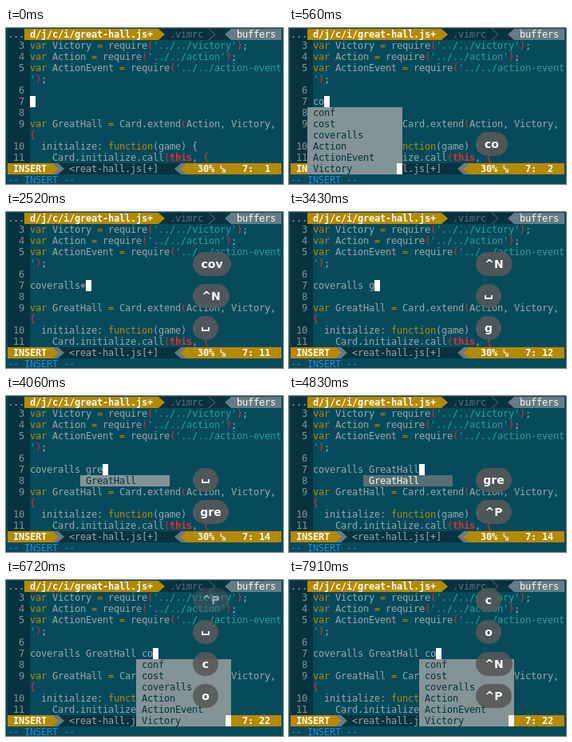
Animation of 347x195 px, one loop 8000 ms. Source, as an HTML page with a canvas:

```html
<!DOCTYPE html>
<html lang="en">
<head>
<meta charset="utf-8">
<title>Editor completion</title>
<style>
html, body { margin: 0; width: 100%; height: 100%; overflow: hidden; background: #064a5c; }
canvas { display: block; }
</style>
</head>
<body>
<canvas id="stage" width="347" height="195"></canvas>
<script>
const ctx = document.getElementById('stage').getContext('2d');
const LOOP = 8000, TICK = 70;
const CELL_W = 7, CELL_H = 14, LEFT = 2, TOP = 1, TEXT_COL = 4, INPUT_ROW = 6, STATUS_ROW = 12;
const MONO = '12px "DejaVu Sans Mono", monospace';
const color = {
  bg: '#064a5c', dark: '#07333f', text: '#9aa8a8', number: '#839496', dim: '#5b7178',
  yellow: '#b58900', red: '#dc322f', cyan: '#2aa198', blue: '#268bd2',
  light: '#fdfaf0', grey: '#657b83', menu: '#839496', menuSelected: '#586e75', menuText: '#06303b'
};

const code = [
  ['3', "var Victory = require('../../victory');"],
  ['4', "var Action = require('../../action');"],
  ['5', "var ActionEvent = require('../../action-event"],
  ['', "');"],
  ['6', ''],
  ['7', ''],
  ['8', ''],
  ['9', 'var GreatHall = Card.extend(Action, Victory,'],
  ['', '{'],
  ['10', '  initialize: function(game) {'],
  ['11', '    Card.initialize.call(this, {']
];

// Each state: start time, typed text, shown column, menu items, menu text column, selected item
const matches = ['conf', 'cost', 'coveralls', 'Action', 'ActionEvent', 'Victory'];
const covMatches = ['coveralls', 'ActionEvent'], hall = ['GreatHall'];
const done = 'coveralls GreatHall ';
const states = [
  [0, '', 1],
  [420, 'c', 2],
  [560, 'co', 2, matches, 0],
  [840, 'cov', 4, covMatches, 0],
  [1750, 'coveralls', 4, covMatches, 0, 0],
  [2520, 'coveralls ', 11],
  [3430, 'coveralls g', 12],
  [3570, 'coveralls gr', 12, hall, 10],
  [3640, 'coveralls gre', 12, hall, 10],
  [3710, 'coveralls gre', 14, hall, 10],
  [4550, 'coveralls GreatHall', 14, hall, 10, 0],
  [5320, done, 21],
  [6580, done + 'c', 22],
  [6720, done + 'co', 22, matches, 20],
  [7280, done + 'conf', 22, matches, 20, 0],
  [7910, done + 'co', 22, matches, 20]
];

// Each key bubble is a list of [time, label]
const bubbles = [
  [[420, 'c'], [560, 'co'], [840, 'cov']],
  [[1750, '^N']],
  [[2520, ' ']],
  [[3430, 'g'], [3570, 'gr'], [3640, 'gre']],
  [[4550, '^P']],
  [[5320, ' ']],
  [[6580, 'c']],
  [[6720, 'o']],
  [[7210, '^N']],
  [[7910, '^P']]
];
const bubbleWidth = { co: 40, cov: 48, gr: 37, gre: 45, '^N': 46, '^P': 45 };

const colX = col => LEFT + col * CELL_W;
const rowY = row => TOP + row * CELL_H;
const latest = (list, t) => list.filter(item => item[0] <= t).pop();

function fillCells(col, row, count, fill, rows = 1) {
  ctx.fillStyle = fill;
  ctx.fillRect(colX(col), rowY(row), count * CELL_W, rows * CELL_H);
}

// One character per terminal cell
function write(text, col, row, fill, bold) {
  ctx.font = (bold ? 'bold ' : '') + MONO;
  ctx.fillStyle = fill;
  [...text].forEach((char, i) => ctx.fillText(char, colX(col + i), rowY(row) + 11));
}

// Powerline separator: dir 1 points right, -1 points left
function arrow(col, row, dir, fill, outline) {
  const base = colX(dir > 0 ? col : col + 1), y = rowY(row);
  ctx.beginPath();
  ctx.moveTo(base, y);
  ctx.lineTo(base + dir * (CELL_W + 1), y + CELL_H / 2);
  ctx.lineTo(base, y + CELL_H);
  ctx.fillStyle = ctx.strokeStyle = fill;
  ctx.lineWidth = 1;
  outline ? ctx.stroke() : ctx.fill();
}

function tokenColor(token) {
  if (token[0] === "'") return color.cyan;
  if (/^(var|function|=)$/.test(token)) return color.yellow;
  if (/^(this|[(){}])$/.test(token)) return color.red;
  return color.text;
}

function drawCode() {
  fillCells(0, 1, TEXT_COL, color.dark, code.length);
  code.forEach(([number, line], i) => {
    write(number.padStart(3), 0, i + 1, color.number);
    // A function's parameter list and opening brace stay in the text colour
    for (const { 0: token, index } of line.matchAll(/\(game\) {|'[\w.\/-]*'?|\w+|[^\s\w']/g)) {
      write(token, TEXT_COL + index, i + 1, tokenColor(token), token === 'this');
    }
  });
}

function drawTabs() {
  fillCells(0, 0, 49, color.dark);
  write('...', 0, 0, color.text);
  fillCells(3, 0, 24, color.yellow);
  write('d/j/c/i/great-hall.js+', 4, 0, color.light, true);
  arrow(27, 0, 1, color.yellow);
  write('.vimrc', 29, 0, color.dim);
  arrow(36, 0, 1, color.dim, true);
  arrow(39, 0, -1, color.grey);
  fillCells(40, 0, 9, color.grey);
  write('buffers', 41, 0, color.light);
}

function drawStatus(column) {
  const row = STATUS_ROW;
  fillCells(0, row, 49, color.dark);
  fillCells(0, row, 8, color.yellow);
  fillCells(8, row, 1, color.grey);
  arrow(9, row, 1, color.grey);
  arrow(8, row, 1, color.yellow);
  write('INSERT', 1, row, color.light, true);
  write('<reat-hall.js[+]', 11, row, color.text);
  arrow(30, row, -1, color.grey);
  fillCells(31, row, 1, color.grey);
  arrow(31, row, -1, color.yellow);
  fillCells(32, row, 17, color.yellow);
  write('30%', 34, row, color.light, true);
  write('7:' + String(column).padStart(3), 42, row, color.light, true);
  ctx.font = 'bold 7px "DejaVu Sans Mono", monospace';
  ctx.fillText('L', colX(38), rowY(row) + 7);
  ctx.fillText('N', colX(38) + 3, rowY(row) + 12);
  write('-- INSERT --', 0, row + 1, color.blue);
}

function drawInput(text) {
  const end = TEXT_COL + text.length;
  write(text, TEXT_COL, INPUT_ROW, color.text);
  if (text.endsWith(' ')) {
    ctx.fillStyle = color.grey;
    ctx.beginPath();
    ctx.arc(colX(end - 0.5), rowY(INPUT_ROW) + 7, 2.8, 0, 7);
    ctx.fill();
  }
  fillCells(end, INPUT_ROW, 1, '#fff');
}

function drawMenu(items, textCol, selected) {
  const col = TEXT_COL + textCol, top = INPUT_ROW + 1;
  items.forEach((item, i) => {
    const active = i === selected;
    fillCells(col - 1, top + i, 16, active ? color.menuSelected : color.menu);
    write(item, col, top + i, active ? color.light : color.menuText);
  });
  if (items === matches) {
    // Scrollbar: thumb above, track in the last row
    fillCells(col + 15, top, 1, color.menu, items.length - 1);
    fillCells(col + 15, top + items.length - 1, 1, color.light);
  }
}

function drawBubble(label, slot, opacity) {
  const x = 234, y = 130 - 40 * slot, width = bubbleWidth[label] || 32;
  ctx.globalAlpha = opacity;
  ctx.fillStyle = 'rgba(88, 88, 88, 0.88)';
  ctx.beginPath();
  ctx.roundRect(x, y, width, 30, 15);
  ctx.fill();
  ctx.fillStyle = ctx.strokeStyle = '#fff';
  if (label === ' ') {
    ctx.lineWidth = 1.8;
    ctx.beginPath();
    ctx.moveTo(x + 12, y + 14);
    ctx.lineTo(x + 12, y + 18);
    ctx.lineTo(x + 20, y + 18);
    ctx.lineTo(x + 20, y + 14);
    ctx.stroke();
  } else {
    ctx.font = 'bold 14px "DejaVu Sans", sans-serif';
    ctx.textAlign = 'center';
    ctx.fillText(label, x + width / 2, y + 20);
    ctx.textAlign = 'left';
  }
  ctx.globalAlpha = 1;
}

function drawBubbles(t) {
  const started = bubbles.filter(keys => keys[0][0] <= t);
  started.forEach((keys, i) => {
    const [time, label] = latest(keys, t);
    const opacity = Math.min(1, (2310 - (t - time)) / 280);
    if (opacity > 0) drawBubble(label, started.length - 1 - i, opacity);
  });
}

function frame(now) {
  const t = Math.floor((now % LOOP) / TICK) * TICK;
  const [, text, column, items, menuCol, selected] = latest(states, t);
  ctx.fillStyle = color.bg;
  ctx.fillRect(0, 0, 347, 195);
  drawTabs();
  drawCode();
  drawStatus(column);
  drawInput(text);
  if (items) drawMenu(items, menuCol, selected);
  drawBubbles(t);
  requestAnimationFrame(frame);
}
requestAnimationFrame(frame);
</script>
</body>
</html>
```
